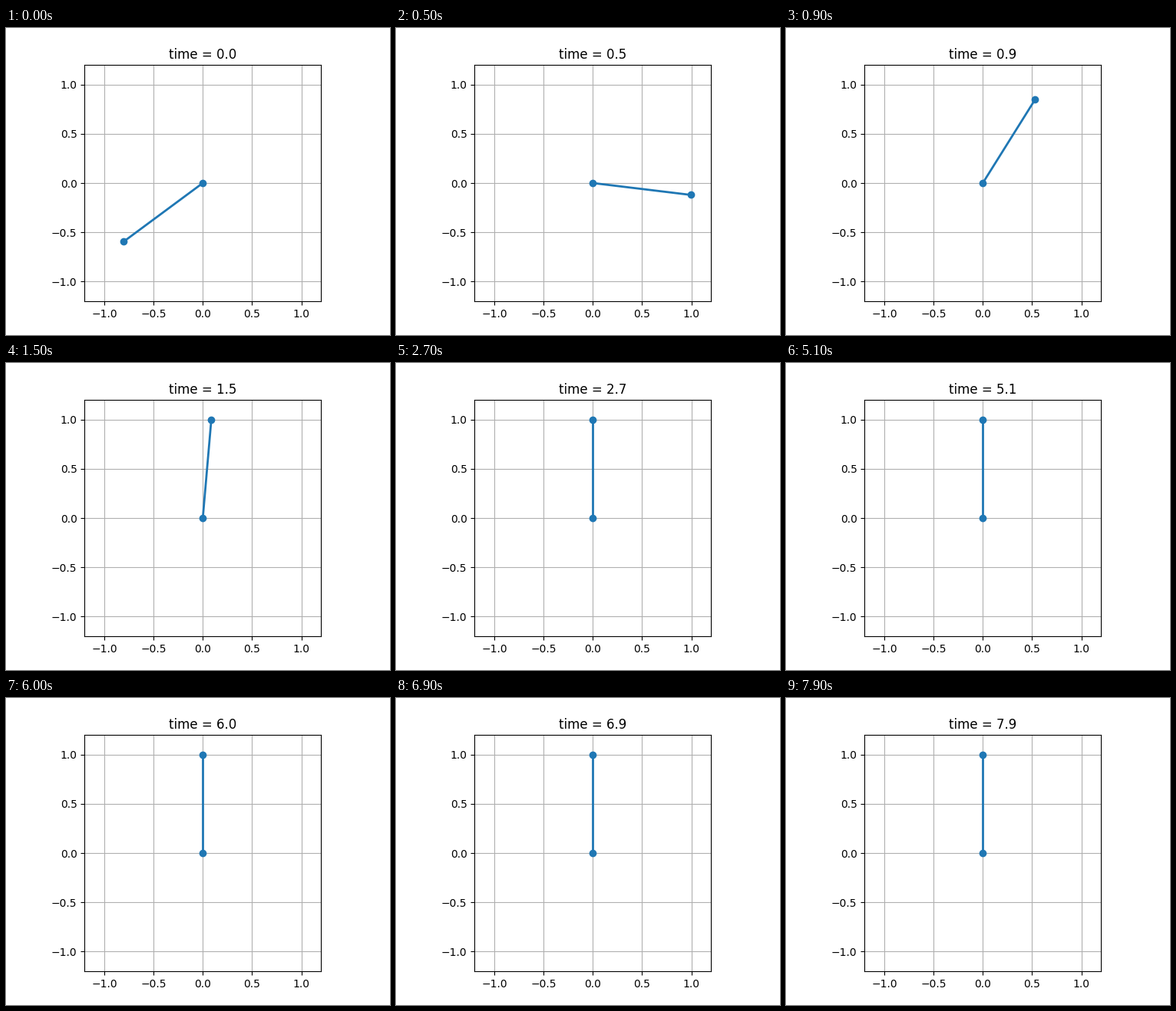
Recreate the animation shown at these times as a matplotlib script. Size 500 by 400 pixels, loop 8000 ms.

```python
import numpy as np
import matplotlib.pyplot as plt
from matplotlib.animation import FuncAnimation

DT = 0.1
FRAMES = 80
START = 4.075      # initial angle from upright, rad
RATE = 3.8         # decay rate of the damped swing-up, 1/s
SLOPE = 3.55       # linear growth term, 1/s
SETTLED = 0.002    # below this the rod rests upright


def angle(t):
    phi = START * (1 + SLOPE * t) * np.exp(-RATE * t)
    return phi if phi > SETTLED else 0.0


fig, ax = plt.subplots(figsize=(5, 4), dpi=100)
ax.set_aspect("equal")
ax.set_xlim(-1.2, 1.2)
ax.set_ylim(-1.2, 1.2)
ticks = np.arange(-1, 1.1, 0.5)
ax.set_xticks(ticks)
ax.set_yticks(ticks)
ax.grid()
rod, = ax.plot([], [], "o-", lw=2)
title = ax.set_title("")


def update(i):
    t = i * DT
    phi = angle(t)
    rod.set_data([0, np.sin(phi)], [0, np.cos(phi)])
    title.set_text(f"time = {t:.1f}")
    return rod, title


anim = FuncAnimation(fig, update, frames=FRAMES, interval=1000 * DT,
                     repeat=True, repeat_delay=0, blit=False)
plt.show()
```
